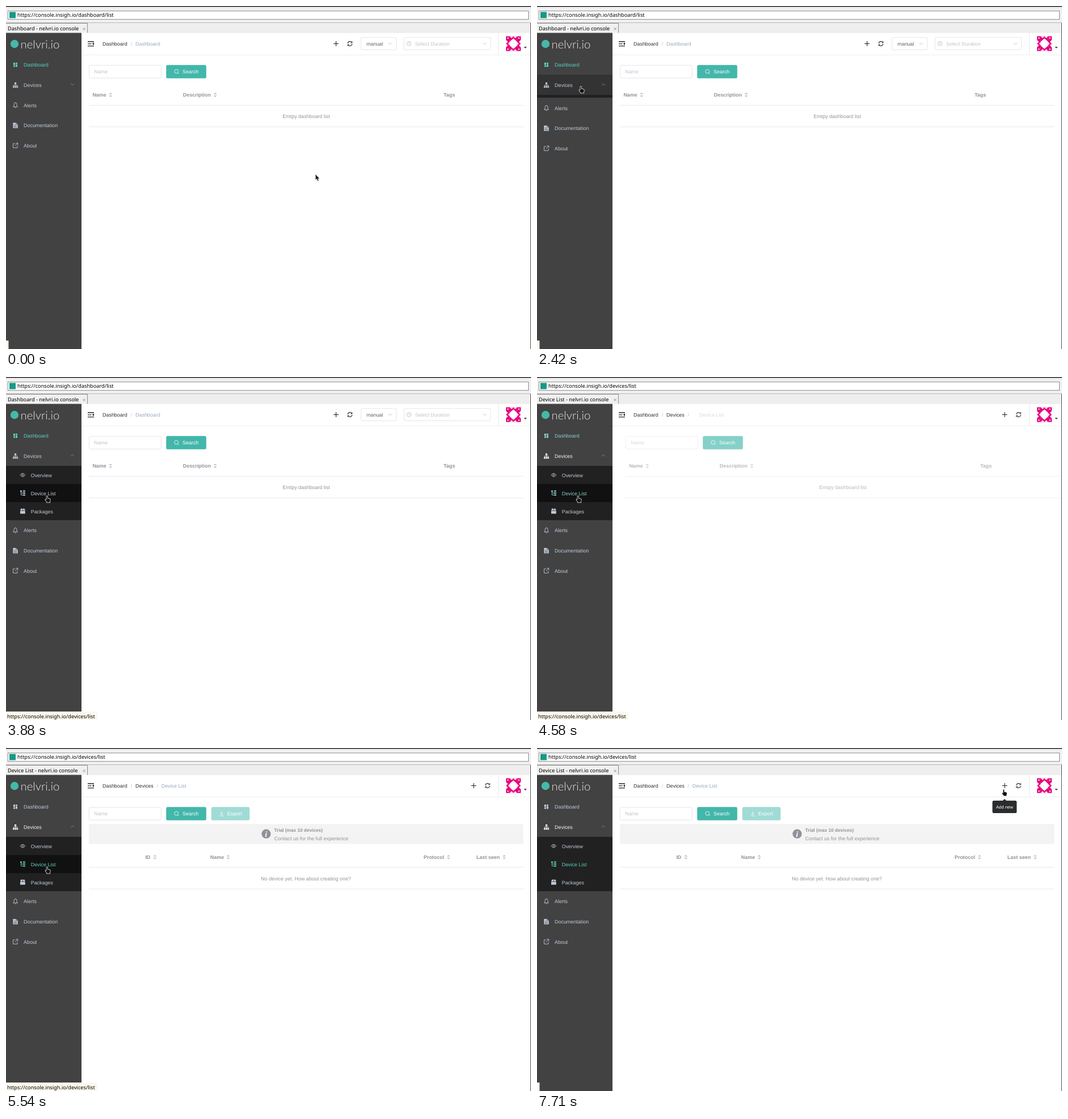
Write an HTML page that moves like this. It is 925 px wide and 606 px high and loops after 8000 ms.

```html
<!DOCTYPE html>
<html lang="en">
<head>
<meta charset="utf-8">
<title>Device console</title>
<style>
html, body { margin: 0; width: 100%; height: 100%; overflow: hidden; background: #fff; }
svg { display: block; width: 100%; height: 100%; overflow: hidden; }
text { font: 8.95px "Liberation Sans", Arial, sans-serif; text-rendering: geometricPrecision; white-space: pre; }
.sys { font: 9.2px "Noto Sans", sans-serif; fill: #000; }
.brand { font: 300 20.4px Lato, sans-serif; fill: #e4e4e4; }
.bold { font-weight: 700; }
.small { font-size: 8.25px; }
.tip { font-size: 7.75px; fill: #fff; }
.mid { text-anchor: middle; }
.ink { fill: #303133; }
.crumb { fill: #97a8be; }
.slash, .hint { fill: #c0c4cc; }
.grey { fill: #909399; }
.white { fill: #fff; }
.item { color: #bfcbd9; fill: currentColor; }
.ln { fill: none; stroke: currentColor; stroke-width: .9; }
.box { fill: #fff; stroke: #dcdfe6; stroke-width: .8; }
.rule { stroke: #e6e9ee; stroke-width: 1; }
.chev { fill: none; stroke: #b4b8c0; stroke-width: .8; }

/* every change is a hard step on one shared 8 s clock */
.an { animation: 8s step-end infinite; }

.url-a { animation-name: url-off; }
.url-b { animation-name: url-on; }
@keyframes url-off { 0% { opacity: 1 } 55.2%, to { opacity: 0 } }
@keyframes url-on { 0% { opacity: 0 } 55.2%, to { opacity: 1 } }

.nav-a { animation-name: nav-off; }
.nav-b { animation-name: nav-on; }
@keyframes nav-off { 0% { opacity: 1 } 57.2%, to { opacity: 0 } }
@keyframes nav-on { 0% { opacity: 0 } 57.2%, to { opacity: 1 } }

.to-grey { animation-name: to-grey; }
.to-white { animation-name: to-white; }
.to-teal { animation-name: to-teal; }
@keyframes to-grey { 0% { color: #57d3bf } 57.2% { color: #8acfca } 58.8%, to { color: #bfcbd9 } }
@keyframes to-white { 0% { color: #bfcbd9 } 57.2%, to { color: #f4f4f5 } }
@keyframes to-teal { 0% { color: #bfcbd9 } 57.2% { color: #8acfca } 58.8%, to { color: #57d3bf } }

.tools { animation-name: tools; }
@keyframes tools { 0% { transform: none } 57.2%, to { transform: translateX(242.5px) } }

.last { animation-name: last; }
@keyframes last {
  0% { opacity: 0; transform: translateX(20px) }
  57.2% { opacity: .4; transform: translateX(12px) }
  58.8% { opacity: .8; transform: translateX(4px) }
  60.3% { opacity: .97; transform: translateX(1px) }
  62.4%, to { opacity: 1; transform: none }
}

.leave { animation-name: leave; }
@keyframes leave {
  0% { opacity: 1; transform: none }
  57.2% { opacity: .65; transform: translateX(10px) }
  58.8% { opacity: .2; transform: translateX(24px) }
  60.3% { opacity: .03; transform: translateX(29px) }
  62.4%, to { opacity: 0; transform: translateX(30px) }
}
.enter { animation-name: enter; }
@keyframes enter {
  0% { opacity: 0; transform: translateX(-30px) }
  64.1% { opacity: .57; transform: translateX(-13px) }
  66.1% { opacity: .87; transform: translateX(-4px) }
  67.6% { opacity: .97; transform: translateX(-1px) }
  69.2%, to { opacity: 1; transform: none }
}

.lower { animation-name: lower; }
@keyframes lower {
  0% { transform: none }
  30.2% { transform: translateY(5px) }
  31.7% { transform: translateY(49px) }
  33.3% { transform: translateY(93.2px) }
  34.8%, to { transform: translateY(95.7px) }
}
.flip { transform-box: fill-box; transform-origin: center; animation-name: flip; }
@keyframes flip {
  0% { transform: none }
  30.2% { transform: rotate(10deg) }
  31.7% { transform: rotate(92deg) }
  33.3% { transform: rotate(176deg) }
  34.8%, to { transform: rotate(180deg) }
}

.hov-dev { animation-name: hov-dev; }
.hov-view { animation-name: hov-view; }
.hov-list { animation-name: hov-list; }
@keyframes hov-dev { 0% { opacity: 0 } 21.3% { opacity: .4 } 22.8% { opacity: 1 } 43.2% { opacity: .5 } 44.7%, to { opacity: 0 } }
@keyframes hov-view { 0% { opacity: 0 } 43.2% { opacity: .6 } 44.7% { opacity: .4 } 46.3%, to { opacity: 0 } }
@keyframes hov-list { 0% { opacity: 0 } 44.7% { opacity: .6 } 46.3% { opacity: 1 } 74.5% { opacity: .5 } 76.6%, to { opacity: 0 } }

.st-view { animation-name: st-view; }
.st-list { animation-name: st-list; }
@keyframes st-view { 0% { opacity: 0 } 43.2% { opacity: 1 } 44.7%, to { opacity: 0 } }
@keyframes st-list { 0% { opacity: 0 } 44.7% { opacity: 1 } 74.5%, to { opacity: 0 } }

.pop { animation-name: pop; }
@keyframes pop { 0% { opacity: 0 } 94.7% { opacity: .45 } 96.3%, to { opacity: 1 } }

.arrow { animation-name: arrow; }
.hand { animation-name: hand; }
@keyframes arrow { 0% { opacity: 1 } 21.3%, to { opacity: 0 } }
@keyframes hand { 0% { opacity: 0 } 21.3%, to { opacity: 1 } }

.cursor { animation-name: cursor; }
@keyframes cursor {
  0% { transform: translate(545px, 297px) }
  9.37% { transform: translate(545px, 297px); animation-timing-function: steps(4, start) }
  11.43% { transform: translate(510px, 271px); animation-timing-function: steps(4, start) }
  13.49% { transform: translate(443px, 226.5px) }
  13.5% { transform: translate(396px, 206px) }
  14.1% { transform: translate(376px, 201px) }
  18.2% { transform: translate(300px, 186px) }
  19.7% { transform: translate(190px, 164px) }
  21.3% { transform: translate(100px, 147px) }
  22.8% { transform: translate(74px, 142px) }
  41.6% { transform: translate(74px, 150px) }
  43.2% { transform: translate(71px, 172px) }
  44.7% { transform: translate(68px, 194px) }
  46.3% { transform: translate(67px, 206px) }
  48.4% { transform: translate(69px, 210px) }
  71.3% { transform: translate(84px, 213px) }
  72.9% { transform: translate(120px, 217px) }
  74.5% { transform: translate(151px, 217px) }
  76.6% { transform: translate(320px, 217px) }
  78.1% { transform: translate(489px, 215px) }
  80.2% { transform: translate(572px, 205px) }
  81.7% { transform: translate(636px, 195px) }
  83.8% { transform: translate(704px, 172px) }
  85.4% { transform: translate(745px, 148px) }
  87% { transform: translate(771px, 129px) }
  89.1% { transform: translate(800px, 105px) }
  91.1% { transform: translate(812px, 88px) }
  92.7% { transform: translate(816px, 78px) }
  94.7%, to { transform: translate(819px, 73px) }
}
</style>
</head>
<body>
<svg viewBox="0 0 925 606" xmlns="http://www.w3.org/2000/svg">
<defs>
  <path id="sort" d="M-3-1L0-4 3-1zM-3 1L0 4 3 1z" fill="#c0c4cc"/>
  <path id="chev" class="chev" d="M-3.2-1.6L0 1.6 3.2-1.6"/>
  <g id="side">
    <path d="M-13-13H6.5v6.5h-9.7L-6.5-3.2V-6.5H-13z" fill="#e6007e"/>
    <path d="M-6.5-13H0l-3.2 3.2zM0-13h6.5L3.2-9.8zM-3.2-6.5L0-9.2 3.2-6.5zM-9.7-11.2l1.5 1.5-1.5 1.5-1.5-1.5z" fill="#fff"/>
  </g>
  <g id="search">
    <rect x="282.2" y="104.3" width="70.6" height="23.4" rx="2.5" fill="#43b7aa"/>
    <g fill="none" stroke="#fff" stroke-width=".8"><circle cx="300.2" cy="115.6" r="3.4"/><path d="M302.7 118l2 2"/></g>
    <text x="311" y="119.3" class="white">Search</text>
    <rect x="146.4" y="104.9" width="127" height="22.4" rx="2.5" class="box"/>
    <text x="155.2" y="119.3" class="hint">Name</text>
  </g>
</defs>

<rect width="925" height="606" fill="#fff"/>

<!-- browser frame -->
<rect width="925" height="47.5" fill="#f0f0f0"/>
<rect width="925" height="1.4" fill="#161616"/>
<rect x="3.5" y="8.8" width="917" height="14.8" fill="#fff" stroke="#8c8c8c"/>
<rect x="6" y="10.5" width="11" height="11" fill="#159a86"/>
<g class="an url-a">
  <text x="20" y="19.2" class="sys">https://console.insigh.io/dashboard/list</text>
</g>
<g class="an url-b">
  <text x="20" y="19.2" class="sys">https://console.insigh.io/devices/list</text>
</g>
<path d="M0 29.5H925" stroke="#b8b8b8"/>
<rect x="144" y="30" width="781" height="17.5" fill="#eee"/>
<path d="M0 30.5H143.5V47.5" fill="none" stroke="#8a8a8a"/>
<text x="3" y="43" class="sys an url-a">Dashboard - nelvri.io console</text>
<text x="3" y="43" class="sys an url-b">Device List - nelvri.io console</text>
<path d="M135.6 38.4l4 4.2m0-4.2l-4 4.2" stroke="#777" stroke-width=".8"/>

<!-- header -->
<path d="M133 86.5H924" stroke="#eceef0"/>
<path d="M867.8 47.5V86" stroke="#e8e8e8"/>
<path d="M144 63h11M144 66.8h6.5M144 70.6h11" stroke="#222" stroke-width="1.3"/>
<path d="M155 64.5v4.6l-3.3-2.3z" fill="#222"/>
<text x="170" y="69.7" class="ink">Dashboard</text>
<text x="219.7" y="69.7" class="slash">/</text>
<text x="228" y="69.7" class="crumb an nav-a">Dashboard</text>
<g class="an nav-b">
  <text x="228" y="69.7" class="ink">Devices</text>
  <text x="265.5" y="69.7" class="slash">/</text>
</g>
<text x="273.7" y="69.7" class="crumb an last">Device List</text>
<g class="an tools" fill="none" stroke="#222" stroke-width="1.1">
  <path d="M577 66.5h9M581.5 62v9"/>
  <path d="M602.2 66A3.9 3.9 0 0 1 609.5 64.6M609.8 67A3.9 3.9 0 0 1 602.5 68.4"/>
  <path d="M609.9 62.4v2.6h-2.6M602.1 70.6V68h2.6" stroke-width=".9"/>
</g>
<g class="an nav-a">
  <rect x="625.4" y="55.4" width="62.4" height="22" rx="2.5" class="box"/>
  <text x="635" y="69.6" fill="#606266">manual</text>
  <use href="#chev" x="677" y="66.5"/>
  <rect x="701.4" y="55.4" width="152.4" height="22" rx="2.5" class="box"/>
  <circle cx="710" cy="66.4" r="3.7" class="chev"/>
  <path d="M710 64v2.6h2" class="chev"/>
  <text x="720.8" y="69.6" class="hint">Select Duration</text>
  <use href="#chev" x="843.3" y="66.5"/>
</g>
<g transform="translate(894 66.5)">
  <use href="#side"/><use href="#side" transform="rotate(90)"/>
  <use href="#side" transform="rotate(180)"/><use href="#side" transform="rotate(270)"/>
</g>
<path d="M912.3 72h5.4l-2.7 3z" fill="#444"/>

<!-- dashboard page -->
<g class="an leave">
  <use href="#search"/>
  <g class="grey">
    <text x="152.4" y="160.2" class="bold">Name</text>
    <text x="311.8" y="160.2" class="bold">Description</text>
    <text x="771" y="160.2" class="bold">Tags</text>
  </g>
  <use href="#sort" x="184.2" y="157"/><use href="#sort" x="368.6" y="157"/>
  <path d="M146 175.5H911.5M146 213.5H911.5" class="rule"/>
  <text x="529" y="197.8" class="grey mid">Emtpy dashboard list</text>
</g>

<!-- device page -->
<g class="an enter">
  <use href="#search"/>
  <rect x="361.7" y="104.3" width="67.5" height="23.4" rx="2.5" fill="#a1dbd5"/>
  <path d="M380 112v5.4m-2.2-2.2l2.2 2.2 2.2-2.2M376.2 119.8h7.6" fill="none" stroke="#fff" stroke-width=".8"/>
  <text x="389.8" y="119.3" class="white">Export</text>
  <rect x="146" y="134.3" width="765.5" height="35.2" rx="2.5" fill="#f3f3f3"/>
  <circle cx="458.4" cy="151.7" r="8.1" fill="#8f9298"/>
  <text x="458.2" y="156.6" class="white mid" style="font:italic 700 14px 'Liberation Serif',serif">i</text>
  <g class="grey">
    <text x="472.6" y="148.4" class="bold small">Trial (max 10 devices)</text>
    <text x="472.6" y="162.8">Contact us for the full experience</text>
    <text x="245.4" y="196" class="bold">ID</text>
    <text x="359.8" y="196" class="bold">Name</text>
    <text x="735.7" y="196" class="bold">Protocol</text>
    <text x="828.8" y="196" class="bold">Last seen</text>
    <text x="528.6" y="233.6" class="mid">No device yet. How about creating one?</text>
  </g>
  <use href="#sort" x="262.3" y="192.8"/><use href="#sort" x="391.6" y="192.8"/>
  <use href="#sort" x="779.7" y="192.8"/><use href="#sort" x="877.8" y="192.8"/>
  <path d="M146 210.5H911.5M146 249H911.5" class="rule"/>
</g>

<!-- sidebar -->
<rect y="47.5" width="133" height="559" fill="#424242"/>
<circle cx="15" cy="67" r="7.2" fill="#45b9a8"/>
<text x="25.5" y="75" class="brand">nelvri.io</text>
<g class="item an to-grey">
  <path d="M13 100h3v4.2h-3zM17 100h3v2.4h-3zM17 103.3h3v4.2h-3zM13 105.1h3v2.4h-3z"/>
  <text x="31" y="107.2">Dashboard</text>
</g>
<rect y="121.5" width="133" height="35.5" fill="#333" class="an hov-dev"/>
<g class="item an to-white">
  <path d="M15 135h3.2v3H15zM12 141.5h2.8v2.8H12zM15.2 141.5H18v2.8h-2.8zM18.4 141.5h2.8v2.8h-2.8z"/>
  <path d="M16.6 138v3.6M13.4 141.6v-1.9h6.4v1.9" class="ln"/>
  <text x="31" y="143">Devices</text>
</g>
<g class="an flip"><path d="M113.8 137l3.2 3.2 3.2-3.2" class="chev" style="stroke:#8a8f96"/></g>

<g>
  <rect y="157" width="133" height="97" fill="#212121"/>
  <rect y="189" width="133" height="32" fill="#111" class="an hov-list"/>
  <rect y="157" width="133" height="32" fill="#111" class="an hov-view"/>
  <g class="item">
    <path d="M25 173.2q4.4-6 8.8 0q-4.4 6-8.8 0z" class="ln"/>
    <circle cx="29.4" cy="173.2" r="1.4" class="ln"/>
    <text x="43.7" y="176.7">Overview</text>
  </g>
  <g class="item an to-teal">
    <path d="M25 200.5h3v2.2h-3zM29.8 200.5h4.2v2h-4.2zM29.8 204h4.2v2h-4.2zM29.8 207.5h4.2v2h-4.2z"/>
    <path d="M26.4 202v6.5h3.4M26.4 205h3.4" class="ln"/>
    <text x="43.7" y="208.6">Device List</text>
  </g>
  <g class="item">
    <path d="M26.2 232.5h2.8v3.3h-4zM29.7 232.5h2.8l1.3 3.3h-4.1zM25 236.6h8.8v4.8H25z"/>
    <text x="43.7" y="240.5">Packages</text>
  </g>
</g>

<g class="an lower">
  <rect y="157" width="133" height="460" fill="#424242"/>
  <g class="item">
    <path d="M12.2 178h8.6M13.3 178q.9-1 .9-4.2a2.4 2.9 0 0 1 4.8 0q0 3.2.9 4.2M15.6 179.6h2M16.6 170v1" class="ln"/>
    <text x="31" y="178.7">Alerts</text>
    <path d="M12.4 206.3h5.2l3.2 3.2v6.3h-8.4z"/>
    <path d="M14 210.3h2.6M14 212.3h5.2M14 214.1h5.2M17.5 206.6v3h3" fill="none" stroke="#424242" stroke-width=".7"/>
    <text x="31" y="214.4">Documentation</text>
    <path d="M16 243.2h-3.4v7.4h7.4v-3.4M16 247.2l4.6-4.8M17.4 242.2h3.4v3.4" class="ln"/>
    <text x="31" y="250.1">About</text>
  </g>
</g>

<!-- status bar -->
<rect y="591" width="4.5" height="15" fill="#fdf8ec"/>
<g class="an st-view">
  <rect y="591" width="187" height="15" fill="#fdf8ec"/>
  <text x="2" y="603" class="sys">https://console.insigh.io/devices/overview</text>
</g>
<g class="an st-list">
  <rect y="591" width="161" height="15" fill="#fdf8ec"/>
  <text x="2" y="603" class="sys">https://console.insigh.io/devices/list</text>
</g>
<path d="M924.5 30V606" stroke="#4a4a4a"/>

<g class="an pop">
  <path d="M820 93.5l3.8-3.6 3.8 3.6z" fill="#303133"/>
  <rect x="802.4" y="93" width="42.8" height="22" rx="2.5" fill="#2b2c2e"/>
  <text x="823.8" y="106.8" class="tip mid">Add new</text>
</g>

<g class="an cursor">
  <path class="an arrow" d="M.5.4v9.7l2.2-1.9 1.6 3.8 1.6-.7-1.6-3.6h2.9z" fill="#222" stroke="#fff" stroke-width=".6" paint-order="stroke"/>
  <path class="an hand" d="M2.4.8q1-1.2 1.8 0v3.9l3.4.6q1.5.4 1.3 1.8l-.6 2.9v1.6H3v-1.2L.5 7.5Q-.2 6.2 1.3 6.2l1.1.8z" fill="#111" stroke="#fff" stroke-width="1.4" paint-order="stroke"/>
</g>
</svg>
</body>
</html>
```
